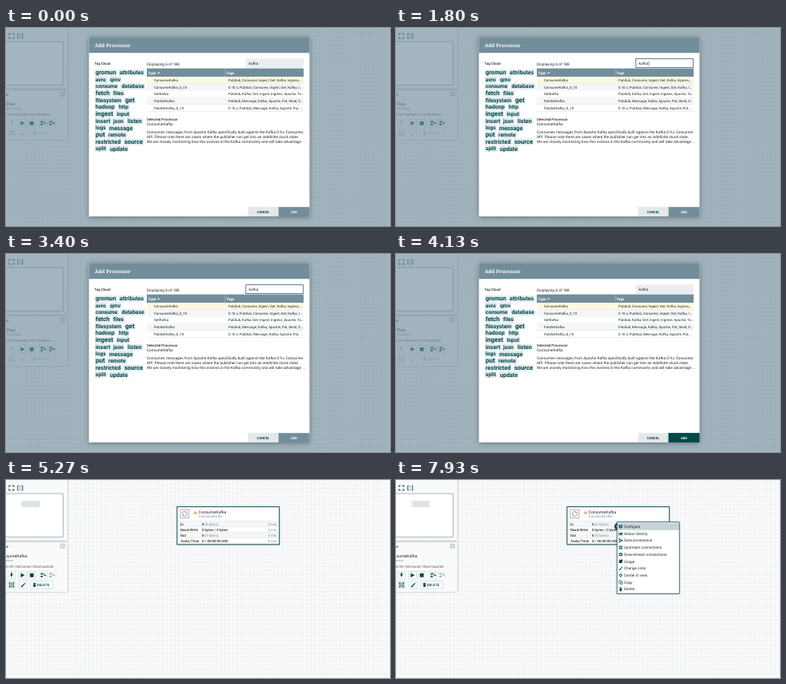
An HTML page that plays this animation: 480x248 px, repeating every 8 s.

```html
<!DOCTYPE html>
<html lang="en">
<head>
<meta charset="utf-8">
<title>Add Processor</title>
<style>
  html, body { margin: 0; width: 100%; height: 100%; overflow: hidden; background: #f9fafb; }
  svg { display: block; width: 480px; height: 248px; }
  text { font-family: Roboto, sans-serif; text-rendering: geometricPrecision; white-space: pre; }
  .slab { font-family: "Noto Serif", serif; }
  .raised { filter: drop-shadow(0 .6px 1.2px rgba(0, 0, 0, .35)); }
  .lifted { filter: drop-shadow(0 1px 3px rgba(0, 0, 0, .35)); }
</style>
</head>
<body>
<svg id="stage" viewBox="0 0 480 248" xmlns="http://www.w3.org/2000/svg"></svg>
<script>
const TEAL = '#004849', SLATE = '#728e9b', INK = '#262626', LINE = '#c7d2d7', PALE = '#f4f6f7';
const LOOP = 8000;
const stage = document.getElementById('stage');
const parts = {};

function add(parent, tag, attrs = {}, text) {
  const node = document.createElementNS('http://www.w3.org/2000/svg', tag);
  for (const key in attrs) node.setAttribute(key, attrs[key]);
  if (text !== undefined) node.textContent = text;
  return parent.appendChild(node);
}
const group = (parent, attrs) => add(parent, 'g', attrs);
const part = (name, parent = stage, attrs) => (parts[name] = group(parent, attrs));
const rect = (p, x, y, width, height, fill, more) => add(p, 'rect', { x, y, width, height, fill, ...more });
const path = (p, d, fill = TEAL, more) => add(p, 'path', { d, fill, ...more });
const stroke = (p, d, color = TEAL, width = 0.7) =>
  path(p, d, 'none', { stroke: color, 'stroke-width': width });
const label = (p, x, y, text, size, fill = INK, more) =>
  add(p, 'text', { x, y, 'font-size': size, fill, ...more }, text);
const at = (p, x, y, more) => group(p, { transform: `translate(${x} ${y})`, ...more });

const BOLD = { 'font-weight': 700 }, MEDIUM = { 'font-weight': 500 };
const END = { 'text-anchor': 'end' }, MID = { 'text-anchor': 'middle' };

function drawGrid() {
  const grid = add(add(stage, 'defs'), 'pattern',
    { id: 'grid', width: 5.15, height: 5.15, patternUnits: 'userSpaceOnUse' });
  path(grid, 'M0 0H5.15V.5H.5V5.15H0Z', '#e5ebed');
  rect(stage, 0, 0, 480, 248, '#f9fafb');
  rect(stage, 0, 0, 480, 248, 'url(#grid)');
}

function button(p, x, y, width, on, draw) {
  const g = at(p, x, y, { opacity: on });
  rect(g, -width / 2, -4.7, width, 9.4, '#fbfcfc', { stroke: '#cbd5d9', 'stroke-width': 0.6 });
  draw(g);
}

const icons = {
  bolt: g => path(g, 'M-.8 -3H1.4L.4 -.7H1.8L-1 3L-.4 .4H-1.7Z'),
  play: g => path(g, 'M-2.2 -2.7L2.9 0L-2.2 2.7Z'),
  stop: g => rect(g, -2.4, -2.4, 4.8, 4.8, TEAL),
  template: g => {
    path(g, 'M-3.4 -2.9H.2V-.9H-3.4ZM-3.4 .7H-.6V2.6H-3.4ZM.6 -.5H3.6V1H.6Z');
    stroke(g, 'M-2 -1V1M.2 -1.9H2V-.4', TEAL, 0.5);
  },
  group: g => {
    stroke(g, 'M-2.6 -2.6H2.6V2.6H-2.6ZM-1.2 -1.2H1.2V1.2H-1.2Z', TEAL, 0.6);
    path(g, 'M-3.2 -3.2h1.3v1.3h-1.3ZM1.9 -3.2h1.3v1.3h-1.3ZM-3.2 1.9h1.3v1.3h-1.3ZM1.9 1.9h1.3v1.3h-1.3Z');
  },
  brush: g => path(g, 'M2.8 -3L3.2 -2.5L.4 1L-.8 0ZM-1.1 .4L0 1.3C-.3 2.8 -1.8 3 -3 2.7C-2 2.2 -2.3 .8 -1.1 .4Z'),
  trash: g => path(g, 'M-1.8 -1.5H1.8V-2.1H.7V-2.6H-.7V-2.1H-1.8ZM-1.5 -1.1H1.5L1.2 2.5H-1.2Z')
};

function operateState(name, title, kind, id, picked) {
  const g = part(name);
  label(g, picked ? 26.6 : 12, 96.6, title, 5.2, INK, END);
  label(g, picked ? 9 : 18.2, 102.2, kind, 3.8, SLATE, END);
  label(g, picked ? 59.4 : 56.6, 110, id, 4.2, '#775351', END);
  const on = picked ? 1 : 0.3;
  button(g, 7, 119.3, 9.6, on, icons.bolt);
  button(g, 20.6, 119.3, 9.6, 1, icons.play);
  button(g, 32.2, 119.3, 9.6, 1, icons.stop);
  button(g, 46.6, 119.3, 9.6, picked ? 0.8 : 1, icons.template);
  button(g, 57.6, 119.3, 9.6, picked ? 0.35 : 1, icons.template);
  button(g, 7, 131.4, 9.6, on, icons.group);
  button(g, 21.4, 131.4, 9.6, on, icons.brush);
  button(g, 44.8, 131.4, 28, on, b => {
    icons.trash(at(b, -9.2, 0));
    label(b, -6, 1.6, 'DELETE', 4.4, TEAL, MEDIUM);
  });
}

function drawPanels() {
  for (const [y, h] of [[-10, 85.6], [78, 62]])
    rect(stage, -10, y, 86.8, h, '#f9fafb', { class: 'raised' });
  const fit = at(stage, 6.8, 10);
  stroke(fit, 'M-3 -1V-3H-1M1 -3H3V-1M3 1V3H1M-1 3H-3V1', TEAL, 1);
  const actual = at(stage, 17.8, 10);
  stroke(actual, 'M-1.8 -3H-3V3H-1.8M1.8 -3H3V3H1.8M0 -2.4V-.8M0 .8V2.4', TEAL, 0.9);
  rect(stage, -5, 17, 76.3, 54.5, '#fff', { stroke: '#7f9aa4', 'stroke-width': 0.7 });
  label(stage, 2.6, 84.6, 'Operate', 4.6, TEAL, { ...END, ...MEDIUM });
  stroke(stage, 'M68.3 80.3H73V85H68.3ZM69.4 82.7H71.9', SLATE, 0.6);
  operateState('rootInfo', 'NiFi Flow', 'Process Group', '7c1f0a52-0159-1000-e823-12f1f850897a', false);
  operateState('procInfo', 'ConsumeKafka', 'Processor', '7c20de4d-0159-1000-de4d-728b47ae4284', true);
}

function drawProcessor() {
  const g = part('processor');
  rect(g, 19.5, 26, 22.5, 8, '#dde4e9');
  rect(g, 213.9, 33.6, 127.8, 47.2, '#fff', { class: 'raised' });
  rect(g, 218, 37, 10.8, 10.8, '#fff', { stroke: '#6f858e', 'stroke-width': 0.6 });
  const swirl = at(g, 223.4, 42.4);
  stroke(swirl, 'M-2.6 1.2A2.8 2.8 0 0 1 1.9 -2.1M2.6 -1.2A2.8 2.8 0 0 1 -1.9 2.1', '#ad9897', 1);
  path(swirl, 'M1 -3.6L3.4 -1.6L.9 -.9ZM-1 3.6L-3.4 1.6L-.9 .9Z', '#ad9897');
  path(g, 'M236.7 38.2L239.2 42.6H234.2Z', '#cf9f5d');
  path(g, 'M236.4 39.5h.6v1.6h-.6ZM236.4 41.5h.6v.6h-.6Z', '#fff');
  label(g, 240.6, 42.3, 'ConsumeKafka', 5.1);
  label(g, 240.6, 47.1, 'ConsumeKafka', 4.4, '#6d99ab');
  const stats = [['In', '0', ' (0 bytes)'], ['Read/Write', '0 bytes / 0 bytes', ''],
    ['Out', '0', ' (0 bytes)'], ['Tasks/Time', '0 / 00:00:00.000', '']];
  stats.forEach(([name, value, extra], i) => {
    const y = 51.7 + i * 6.95;
    rect(g, 214, y, 127.6, 6.95, i % 2 ? '#fff' : PALE);
    rect(g, 214, y, 127.6, 0.35, LINE);
    label(g, 218, y + 5.1, name, 4.4, INK, MEDIUM);
    const text = label(g, 245, y + 5.1, value, 4.4, INK, MEDIUM);
    if (extra) add(text, 'tspan', { fill: SLATE, 'font-weight': 400 }, extra);
    label(g, 327.5, y + 5.1, '5 min', 4.4, SLATE);
  });
  rect(g, 214, 79.5, 127.6, 0.35, LINE);
  rect(g, 213.9, 33.6, 127.8, 47.2, 'none', { stroke: TEAL, 'stroke-width': 0.9 });

  const link = at(part('link'), 277.6, 58.2);
  add(link, 'circle', { r: 4.6, fill: TEAL });
  path(link, 'M-2.6 -.6H.2V-2.3L2.8 0L.2 2.3V.6H-2.6Z', '#fff');
}

const disc = d => g => {
  add(g, 'circle', { r: 2.3, fill: TEAL });
  path(g, d, '#fff');
};
const menuItems = [
  ['Configure', g => {
    add(g, 'circle', { r: 1.5, fill: 'none', stroke: TEAL, 'stroke-width': 1.1 });
    stroke(g, 'M0 -2.4V-1.5M0 1.5V2.4M-2.4 0H-1.5M1.5 0H2.4M-1.7 -1.7L-1 -1M1 1L1.7 1.7M-1.7 1.7L-1 1M1 -1L1.7 -1.7', TEAL, 0.8);
  }],
  ['Status History', g => path(g, 'M-2.6 -2.2h.5V1.7H2.6V2.2H-2.6ZM-1.7 1.3V0L-.6 -1.2L.6 -.3L2.2 -1.8V1.3Z')],
  ['Data provenance', g => {
    stroke(g, 'M-1.5 -1.5L1 0L-1.5 1.5', TEAL, 0.6);
    path(g, 'M-2.4 -2.4h1.8v1.8h-1.8ZM.4 -.9h1.9v1.8H.4ZM-2.4 .7h1.8v1.8h-1.8Z');
  }],
  ['Upstream connections', disc('M-1.6 0L.3 -1.5V-.5H1.5V.5H.3V1.5Z')],
  ['Downstream connections', disc('M1.6 0L-.3 -1.5V-.5H-1.5V.5H-.3V1.5Z')],
  ['Usage', g => path(g, 'M-1.5 -2.2H2.6L1.6 2H-2.5Z')],
  ['Change color', g => icons.brush(group(g, { transform: 'scale(.8)' }))],
  ['Center in view', g => {
    add(g, 'circle', { r: 1.5, fill: 'none', stroke: TEAL, 'stroke-width': 0.7 });
    stroke(g, 'M0 -2.5V-.7M0 .7V2.5M-2.5 0H-.7M.7 0H2.5', TEAL, 0.6);
  }],
  ['Copy', g => stroke(g, 'M-2.2 -2.2H.7V.8H-2.2ZM-.7 .8V2.3H2.2V-.8H.7', TEAL, 0.6)],
  ['Delete', icons.trash]
];

function drawMenu() {
  const g = part('menu');
  rect(g, 276.2, 52.8, 78, 89.6, '#fff', { class: 'raised' });
  rect(part('picked', g), 276.4, 54, 77.8, 8.7, LINE);
  menuItems.forEach(([name, icon], i) => {
    const y = 58.3 + i * 8.72;
    icon(at(g, 280.9, y));
    label(g, 285, y + 1.6, name, 4.72);
  });
  rect(g, 276.2, 52.8, 78, 89.6, 'none', { stroke: TEAL, 'stroke-width': 0.7 });
}

// Each line: words as [text, x, size]
const cloud = [
  [['gromun', 112, 7.4], ['attributes', 142, 6.9]],
  [['avro', 112, 6.6], ['qmv', 130, 6.8]],
  [['consume', 112, 6.65], ['database', 144.5, 6.8]],
  [['fetch', 112, 7.6], ['files', 134, 6.8]],
  [['filesystem', 112, 6.9], ['get', 149, 8]],
  [['hadoop', 112, 7.1], ['http', 141, 6.7]],
  [['ingest', 112, 7.9], ['input', 138.5, 6.8]],
  [['insert', 112, 7], ['json', 134, 6.8], ['listen', 152, 7.1]],
  [['logs', 112, 6.6], ['message', 129, 7.2]],
  [['put', 112, 8], ['remote', 128, 6.8]],
  [['restricted', 112, 7.2], ['source', 148, 7.5]],
  [['split', 112, 6.7], ['update', 130, 7.1]]
];

function drawCloud(g) {
  cloud.forEach((words, i) => {
    const y = 55.8 + i * 8.68;
    for (const [word, x, size] of words) {
      const box = rect(g, x - 1.2, y - 3.9, 0, 7.8, '#dfe8ea');
      const text = label(g, x, y + size * 0.32, word, size, TEAL, BOLD);
      box.setAttribute('width', text.getComputedTextLength() + 2.4);
    }
  });
}

const rows = [
  ['ConsumeKafka', 'PubSub, Consume, Ingest, Get, Kafka, Ingress,...'],
  ['ConsumeKafka_0_10', '0.10.x, PubSub, Consume, Ingest, Get, Kafka, I...'],
  ['GetKafka', 'PubSub, Kafka, Get, Ingest, Ingress, Apache, To...'],
  ['PublishKafka', 'PubSub, Message, Kafka, Apache, Put, Send, 0...'],
  ['PublishKafka_0_10', '0.10.x, PubSub, Message, Kafka, Apache, Put, ...']
];

function drawTable(g) {
  rect(g, 176, 50.6, 196, 10.4, SLATE);
  rect(g, 273.8, 50.6, 0.4, 10.4, LINE);
  label(g, 177.6, 57.5, 'Type', 4.5, '#fff', BOLD);
  path(g, 'M189.4 57L190.8 54.8L192.2 57Z', '#fff');
  label(g, 275.6, 57.5, 'Tags', 4.5, '#fff', BOLD);
  rows.forEach(([type, tags], i) => {
    const y = 61 + i * 8.72;
    rect(g, 176, y, 196, 8.72, i === 0 ? '#fef8e2' : i % 2 ? PALE : '#fff');
    if (i) rect(part('hover' + i, g), 176, y, 196, 8.72, '#dbe2e6');
    rect(g, 176, y + 8.4, 196, 0.35, LINE);
    label(g, 185, y + 6, type, 4.4);
    label(g, 278, y + 6, tags, 4.4);
  });
}

function drawDialog() {
  const g = part('dialog');
  rect(g, 0, 0, 480, 248, SLATE, { opacity: 0.65 });
  rect(g, 103.6, 11.2, 275.8, 224.8, '#fff', { class: 'lifted' });
  rect(g, 103.6, 11.2, 275.8, 20, SLATE);
  label(g, 110.8, 23.6, 'Add Processor', 6.2, '#fff', { ...BOLD, class: 'slab' });

  label(g, 110.6, 45.7, 'Tag Cloud', 4.45, INK, MEDIUM);
  drawCloud(g);

  label(g, 176, 46.7, 'Displaying 6 of 188', 4.8);
  rect(g, 299.6, 38.3, 72.4, 11.6, '#eaeef0');
  rect(part('focus', g), 299.8, 38.6, 71.8, 11, '#fff', { stroke: '#45627a', 'stroke-width': 0.8 });
  label(g, 303.6, 45.9, 'kafka', 4.8);
  rect(part('caret', g), 315.8, 41.2, 0.5, 6, INK);
  drawTable(g);

  label(g, 176, 115.7, 'Selected Processor', 4.45, INK, MEDIUM);
  label(g, 176, 122, 'ConsumeKafka', 4.8);
  ['Consumes messages from Apache Kafka specifically built against the Kafka 0.9.x Consumer',
    'API. Please note there are cases where the publisher can get into an indefinite stuck state.',
    'We are closely monitoring how this evolves in the Kafka community and will take advantage ...'
  ].forEach((line, i) => label(g, 176, 132 + i * 5.9, line, 4.78));

  rect(g, 302.6, 224.2, 38, 11.8, '#e3e8eb');
  label(g, 321.5, 231.6, 'CANCEL', 4.1, TEAL, { ...BOLD, ...MID });
  rect(g, 340.6, 224.2, 38.8, 11.8, SLATE);
  rect(part('addHover', g), 340.6, 224.2, 38.8, 11.8, TEAL);
  label(g, 360, 231.6, 'ADD', 4.1, '#fff', { ...BOLD, ...MID });
}

// When each part shows, as [from, to] in ms
const shown = {
  dialog: [[0, 4200]],
  focus: [[1800, 4000]],
  caret: [[1800, 2270], [2800, 3270], [3800, 4000]],
  hover1: [[2470, 2530]],
  hover2: [[2530, 2600]],
  hover3: [[2600, 2730]],
  hover4: [[2730, 2800]],
  addHover: [[3530, 4200]],
  rootInfo: [[0, 4330]],
  procInfo: [[4330, LOOP]],
  processor: [[4330, LOOP]],
  link: [[5330, LOOP]],
  menu: [[6270, LOOP]],
  picked: [[7000, LOOP]]
};

function render(t) {
  for (const name in shown) {
    const on = shown[name].some(([from, to]) => t >= from && t < to);
    parts[name].style.display = on ? '' : 'none';
  }
}

drawGrid();
drawPanels();
drawProcessor();
drawMenu();
drawDialog();

const start = performance.now();
function tick() {
  render((performance.now() - start) % LOOP);
  requestAnimationFrame(tick);
}
tick();
</script>
</body>
</html>
```
